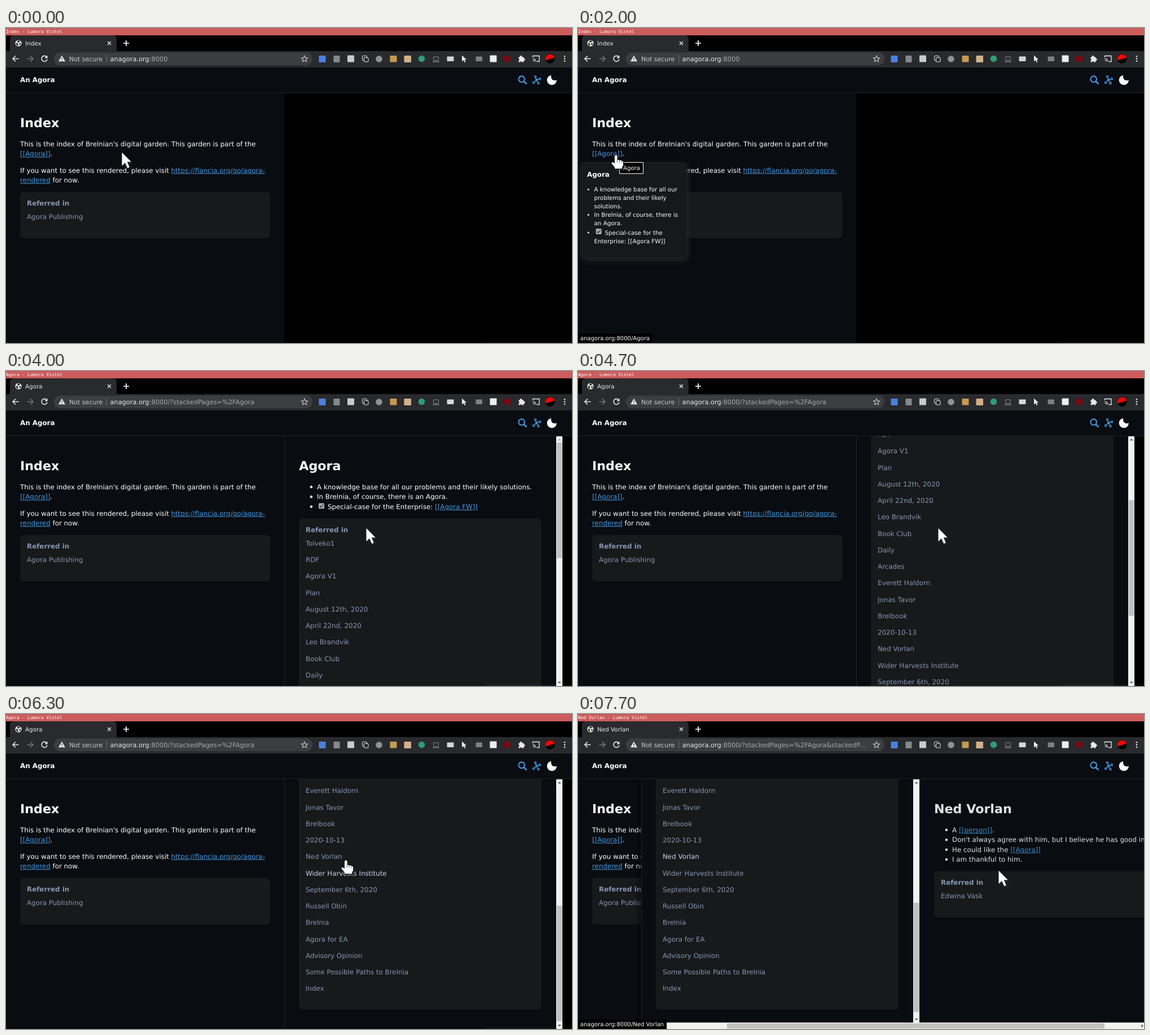
Write an HTML page with a canvas that moves like this. It is 1003 by 559 pixels and loops after 8 s.

```html
<!DOCTYPE html>
<html lang="en">
<head>
<meta charset="utf-8">
<title>Digital garden</title>
<style>
html, body { margin: 0; width: 100%; height: 100%; overflow: hidden; background: #000; }
canvas { display: block; }
</style>
</head>
<body>
<canvas id="stage" width="1003" height="559"></canvas>
<script>
const ctx = document.getElementById('stage').getContext('2d');
const LOOP = 8000, W = 1003, H = 559, TOP = 115.5, ROW = 29.25, LINE = 17.5;
const SANS = '"DejaVu Sans", sans-serif', MONO = '"DejaVu Sans Mono", monospace';
const BODY = 11.86, HEAD = 22.2, SMALL = 10.33;
const PAGE = '#090c11', CARD = '#17191b', EDGE = '#23262b', BAR = '#292a2d', PILL = '#3c3d40';
const BLUE = '#4299e1', MUTED = '#8798b5', HOVER = '#c6d6f0', ICON = '#e8eaed', GREY = '#a6a9ad';

const PERSON = 'Ned Vorlan', INSTITUTE = 'Wider Harvests Institute';
const REFS = ['Tolveko1', 'RDF', 'Agora V1', 'Plan', 'August 12th, 2020', 'April 22nd, 2020',
  'Leo Brandvik', 'Book Club', 'Daily', 'Arcades', 'Everett Haldorn', 'Jonas Tavor', 'Brelbook',
  '2020-10-13', PERSON, INSTITUTE, 'September 6th, 2020', 'Russell Obin', 'Brelnia',
  'Agora for EA', 'Advisory Opinion', 'Some Possible Paths to Brelnia', 'Index'];

// Stepped tracks: [time, values...]
const CURSOR = [[0, 205, 220], [500, 202, 222], [800, 198, 225], [900, 187, 229], [1000, 174, 233],
  [1100, 152, 237], [1200, 128, 237], [1300, 104, 234], [1400, 84, 230], [1500, 67, 226, true],
  [3400, 583, 291], [3700, 612, 284], [3800, 638, 278], [6300, 602, 260, true],
  [6800, 590, 250, true], [7700, 745, 277]];
const SCROLL = [[0, 0], [4400, 111], [4700, 222], [4900, 300], [5200, 360], [5400, 410], [5700, 440], [6000, 462]];
const POPUP = [[0, 0, 0], [1600, .6, -7], [1700, .9, -2], [1800, 1, 0], [3700, .35, 0], [3800, 0, 0]];
const at = (track, t) => track.filter(k => k[0] <= t).pop().slice(1);

function rect(x, y, w, h, color) {
  ctx.fillStyle = color;
  ctx.fillRect(x, y, w, h);
}
function box(x, y, w, h, r, fill, stroke) {
  ctx.beginPath();
  ctx.roundRect(x, y, w, h, r);
  ctx.fillStyle = fill;
  ctx.fill();
  if (stroke) { ctx.strokeStyle = stroke; ctx.lineWidth = 1; ctx.stroke(); }
}
function disc(x, y, r, color) {
  ctx.beginPath();
  ctx.arc(x, y, r, 0, 7);
  ctx.fillStyle = color;
  ctx.fill();
}
function ring(x, y, r, color, width) {
  ctx.beginPath();
  ctx.arc(x, y, r, 0, 7);
  ctx.strokeStyle = color;
  ctx.lineWidth = width;
  ctx.stroke();
}
function line(d, color, width = 1.4) {
  ctx.strokeStyle = color;
  ctx.lineWidth = width;
  ctx.stroke(new Path2D(d));
}
function shape(d, color) {
  ctx.fillStyle = color;
  ctx.fill(new Path2D(d));
}
function moved(x, y, draw) {
  ctx.save();
  ctx.translate(x, y);
  draw();
  ctx.restore();
}
function text(s, x, y, { size = BODY, color = '#fff', bold = false, family = SANS } = {}) {
  ctx.font = `${bold ? 'bold ' : ''}${size}px ${family}`;
  ctx.fillStyle = color;
  ctx.fillText(s, x, y);
  return x + ctx.measureText(s).width;
}
function link(s, x, y, underlined = true) {
  const end = text(s, x, y, { color: BLUE });
  if (underlined) {
    rect(x, y + 1.2, end - x, 1.1, BLUE);
    ctx.strokeStyle = PAGE;
    ctx.lineWidth = 1.4;
    ctx.strokeText(s, x, y);
    text(s, x, y, { color: BLUE });
  }
  return end;
}
const heading = (s, x) => text(s, x, 176, { size: HEAD, bold: true });

function check(x, y) {
  box(x, y, 10, 10, 1.5, '#a9abad');
  line(`M${x + 2} ${y + 5}l2.2 2.4 4-5`, '#33363a', 1.5);
}

function card(x, y, w, h, items, hover) {
  box(x, y, w, h, 6, CARD);
  text('Referred in', x + 12, y + 24, { bold: true, color: MUTED });
  items.forEach((s, i) =>
    text(s, x + 12, y + 47.8 + i * ROW, { color: s === hover ? HOVER : MUTED }));
}

function globe(x, y) {
  disc(x, y, 5.6, ICON);
  shape(`M${x - 4.5} ${y - 1}l3 1 1 3-1 2-2-2zM${x} ${y - 5}l3 1-1 2-3 1-1-2zM${x + 1.5} ${y}l3 0-1 3-2 0z`, BAR);
}

function toolbarIcons() {
  line('M22.5 54.5H12.5M17 49.5l-5 5 5 5', ICON, 1.6);
  line('M37.5 54.5h10M43 49.5l5 5-5 5', '#74777b', 1.6);
  line('M72 51.2A5 5 0 1 0 73 55.5', ICON, 1.6);
  shape('M73.5 48.5v5h-5z', ICON);
  shape('M99 48.8l6 10.4H93z', ICON);
  rect(98.4, 52.5, 1.3, 3.2, PILL);
  rect(98.4, 56.6, 1.3, 1.3, PILL);

  let star = '';
  for (let i = 0; i < 10; i++) {
    const a = -Math.PI / 2 + i * Math.PI / 5, r = i % 2 ? 2.6 : 5.8;
    star += `${i ? 'L' : 'M'}${529 + r * Math.cos(a)} ${55 + r * Math.sin(a)}`;
  }
  line(star + 'Z', '#c8cacd', 1.1);

  box(554.5, 49, 12, 12, 1, '#4a80e0');
  box(580.5, 49, 11, 12, 1, '#85888c');
  box(605, 48.5, 12, 12, 1, '#c9cacc');
  box(631.5, 49.5, 8, 8, 1, BAR, ICON);
  box(634.5, 52.5, 7.5, 7.5, 1, BAR, ICON);
  disc(661, 55, 5.8, '#8f9193');
  box(680.5, 49, 12, 11.5, 1, '#c59a50');
  box(705.5, 49, 12.5, 12, 1, '#d3b08a');
  disc(736.5, 54.5, 5.8, '#2f9c77');
  box(757.5, 51, 9, 6.5, 1, BAR, '#8a8c90');
  rect(756, 59, 12, 1.3, '#8a8c90');
  box(781.5, 50.5, 12, 8.5, 1, '#d5d6d8');
  shape('M808 48.5v11l2.7-2.5 2 4 1.8-1-2-3.8h3.7z', ICON);
  box(832.5, 50.5, 11.5, 8.5, 1, '#7d8083');
  box(857.5, 48.5, 12, 12, 1, '#eceded');
  disc(888, 54.5, 6, '#800610');

  box(908.5, 51.5, 9, 9, 1, ICON);
  disc(912.5, 51, 2, ICON);
  disc(917.8, 55.8, 2, ICON);
  disc(908.3, 56, 1.5, BAR);
  disc(912.7, 60.4, 1.5, BAR);
  line('M933.5 52v-2.5h11.5v10h-4.5', ICON, 1.3);
  line('M933.5 54.2a5.3 5.3 0 0 1 5.3 5.3M933.5 57a2.6 2.6 0 0 1 2.6 2.6', ICON, 1.2);
  disc(964, 54.5, 8.5, '#000');
  shape('M956 57.5A8.5 8.5 0 1 1 972.3 52.6z', '#f00808');
  for (const y of [50.3, 54.5, 58.7]) disc(990, y, 1.3, ICON);
}

function chrome(t) {
  const title = t < 3400 ? 'Index' : t < 7700 ? 'Agora' : PERSON;
  const path = t < 3400 ? '' : t < 7300 ? '/?stackedPages=%2FAgora' : '/?stackedPages=%2FAgora&stackedP...';
  rect(0, 0, W, 13, '#cd5c5c');
  text(`${title} - Lumora Vistel`, 0, 8.7, { size: 7.9, family: MONO });
  rect(0, 13, W, 29, '#000');
  box(7, 13, 189, 32, [6, 6, 0, 0], BAR);
  rect(0, 41, W, 29, BAR);
  globe(22, 27);
  text(title, 34, 30.8, { size: 10.4, color: ICON });
  line('M180 24l6 6m0-6l-6 6', ICON, 1.4);
  line('M208 27h10m-5-5v10', '#fff', 1.7);
  box(85, 43.5, 458, 22.5, 11.2, PILL);
  text('Not secure', 112, 58.5, { size: 11, color: '#c8cacd' });
  rect(178, 48, 1, 13, '#6d7074');
  const x = text('anagora.org', 184.5, 58.5, { size: 11.37, color: ICON });
  text(':8000' + path, x, 58.5, { size: 11.37, color: GREY });
  toolbarIcons();
}

function header() {
  rect(0, 70, W, 45, PAGE);
  rect(0, 114.5, W, 1, EDGE);
  text('An Agora', 25, 96.3, { bold: true });
  ring(913.7, 90.7, 5.3, BLUE, 2.1);
  line('M917.5 94.5l5 5', BLUE, 2.5);
  line('M936 96l4-4 5-1.5M940 92l-2-5M940 92l3 5', BLUE, 1.6);
  disc(940, 92, 2, BLUE);
  for (const [x, y] of [[935, 97], [938, 86.2], [946, 90.3], [943.5, 98]]) ring(x, y, 1.6, BLUE, 1.4);
  disc(967.3, 92.3, 8.6, '#fff');
  disc(972.5, 86.5, 6.6, PAGE);
}

function indexPage(hovered) {
  rect(0, TOP, 493, H, PAGE);
  heading('Index', 25);
  text("This is the index of Brelnian's digital garden. This garden is part of the", 25, 209.8);
  let x = link('[[Agora]]', 25, 227.3, !hovered);
  text('.', x, 227.3);
  x = text('If you want to see this rendered, please visit ', 25, 256.6);
  link('https://flancia.org/go/agora-', x, 256.6);
  x = link('rendered', 25, 274.1);
  text(' for now.', x, 274.1);
  card(25, 291, 443, 82, ['Agora Publishing']);
}

function bullet(x, y, r = 2.2) { disc(x, y - 4, r, '#fff'); }

function vScroll(x, s, bottom) {
  const thumb = bottom - 354, max = 462 + H - bottom;
  rect(x, TOP, 11.5, bottom - TOP, '#f1f1f1');
  rect(x + 1, 127 + 213 * s / max, 9.5, thumb, '#c1c1c1');
  shape(`M${x + 2.8} 123.3h5.8l-2.9-3z`, s ? '#505050' : '#a3a3a3');
  shape(`M${x + 2.8} ${bottom - 7.5}h5.8l-2.9 3z`, '#505050');
}

function agoraPage(x, s, hover, bottom) {
  if (x < 493) {
    const g = ctx.createLinearGradient(x - 12, 0, x, 0);
    g.addColorStop(0, 'rgba(0,0,0,0)');
    g.addColorStop(1, 'rgba(0,0,0,.55)');
    rect(x - 12, TOP, 12, H, g);
  }
  rect(x - 1, TOP, 1, H, EDGE);
  moved(x, 0, () => {
    ctx.beginPath();
    ctx.rect(0, TOP, 492, bottom - TOP);
    ctx.clip();
    rect(0, TOP, 492, H, PAGE);
    moved(0, -s, () => {
      heading('Agora', 25.3);
      const rows = [209.8, 209.8 + LINE, 209.8 + 2 * LINE];
      rows.forEach(y => bullet(47, y));
      text('A knowledge base for all our problems and their likely solutions.', 57, rows[0]);
      text('In Brelnia, of course, there is an Agora.', 57, rows[1]);
      check(60, 234.5);
      const end = text('Special-case for the Enterprise: ', 76, rows[2]);
      link('[[Agora FW]]', end, rows[2]);
      card(25, 262, 430, 724, REFS, hover);
    });
    vScroll(481, s, bottom);
  });
}

function personPage(x) {
  rect(x, TOP, W, H, PAGE);
  moved(x, 0, () => {
    ctx.globalAlpha = .88;
    heading(PERSON, 26);
    const y = i => 209.8 + i * LINE;
    for (let i = 0; i < 4; i++) bullet(48, y(i));
    let end = text('A ', 58, y(0));
    end = link('[[person]]', end, y(0));
    text('.', end, y(0));
    text("Don't always agree with him, but I believe he has good intentions.", 58, y(1));
    end = text('He could like the ', 58, y(2));
    link('[[Agora]]', end, y(2));
    text('I am thankful to him.', 58, y(3));
    ctx.globalAlpha = 1;
    card(26, 279, 440, 82, ['Edwina Vask']);
  });
}

function hScroll(shift) {
  rect(0, 547.5, W, 12, '#f1f1f1');
  rect(11 + shift * .664, 549, 669, 9, '#c1c1c1');
  shape('M998.5 550.5v6l3.2-3z', '#505050');
}

function popup(alpha, dy) {
  if (!alpha) return;
  moved(0, dy, () => {
    ctx.globalAlpha = alpha;
    ctx.shadowColor = '#22252a';
    ctx.shadowBlur = 11;
    ctx.shadowOffsetX = 2;
    ctx.shadowOffsetY = 5;
    box(4.5, 238.5, 188, 169, 6, '#16181a');
    ctx.shadowColor = 'transparent';
    box(4.5, 238.5, 188, 169, 6, '#16181a', '#1f2225');
    text('Agora', 16, 263.5, { bold: true, size: 11.9 });
    const small = { size: SMALL };
    ['A knowledge base for all our', 'problems and their likely', 'solutions.',
      'In Brelnia, of course, there is', 'an Agora.'].forEach((s, i) => text(s, 28.5, 290 + i * 15, small));
    for (const y of [290, 335, 366.5]) bullet(18.3, y + .5, 1.5);
    check(31.7, 356);
    text('Special-case for the', 47.5, 366.5, small);
    text('Enterprise: [[Agora FW]]', 28.5, 381.7, small);
    ctx.globalAlpha = 1;
  });
}

function status(s) {
  const small = { size: 10.04 };
  ctx.font = `${small.size}px ${SANS}`;
  box(0, 542, ctx.measureText(s).width + 9, 18, [0, 4, 0, 0], '#020203');
  text(s, 4, 553.8, small);
}

function cursor(x, y, hand) {
  const arrow = 'M.5 1V24.5L6 19 10.2 28.6 13.8 27 9.8 17.5H16.8Z';
  const pointer = 'M-2 2Q-2-.5 .4-.5Q2.6-.5 2.6 2V8.5Q4.8 7.4 6.4 9Q8.6 8 10 9.8Q13 9.6 13 12.5V18L11 21V23.5H-2V21L-7.5 14.5Q-7.5 12 -5 12.3L-2 14.5Z';
  moved(x, y, () => {
    const p = new Path2D(hand ? pointer : arrow);
    ctx.shadowColor = 'rgba(50,50,50,.7)';
    ctx.shadowBlur = 3;
    ctx.shadowOffsetX = ctx.shadowOffsetY = 2.5;
    ctx.fillStyle = '#fff';
    ctx.fill(p);
    ctx.shadowColor = 'transparent';
    ctx.strokeStyle = '#111';
    ctx.lineWidth = 1.6;
    ctx.stroke(p);
    ctx.fill(p);
    if (hand) line('M2.6 8.5v4M6.4 9.5v3.5M10 10.5v3', '#333', .8);
  });
}

function draw(t) {
  const third = t >= 7300, shift = t >= 7700 ? 381 : 0, bottom = third ? 548 : H;
  const hover = t >= 6800 ? PERSON : t >= 6300 ? INSTITUTE : '';
  ctx.textRendering = 'geometricPrecision';
  rect(0, 0, W, H, '#000');
  indexPage(t >= 1500 && t < 3700);
  if (third) personPage(986 - shift);
  if (t >= 3400) agoraPage(494 - shift, at(SCROLL, t)[0], hover, bottom);
  rect(850, 556, 153, 3, 'rgba(255,255,255,.035)');
  if (third) hScroll(shift);
  header();
  chrome(t);
  popup(...at(POPUP, t));
  if (t >= 1700 && t < 4000) status('anagora.org:8000/Agora');
  if (t >= 6800) status('anagora.org:8000/' + PERSON);
  if (t >= 2000 && t < 3400) {
    box(73.5, 238.5, 42, 20, 0, '#000', '#fff');
    text('Agora', 80, 252, { size: 10.2 });
  }
  cursor(...at(CURSOR, t));
}

const start = performance.now();
function frame() {
  draw((performance.now() - start) % LOOP);
  requestAnimationFrame(frame);
}
frame();
</script>
</body>
</html>
```
